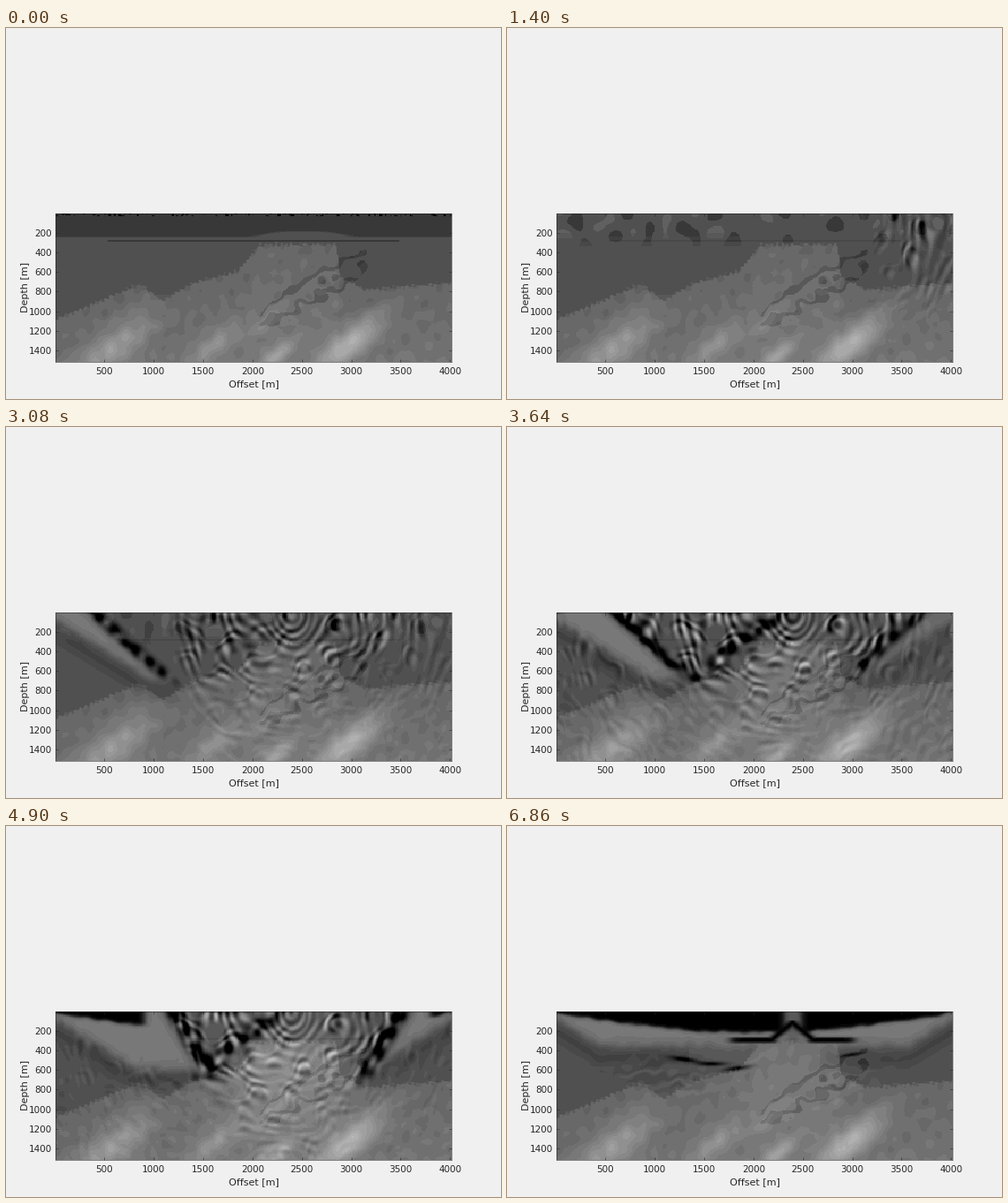
A matplotlib script for the animation above (7000 ms loop, 560 by 420 pixels).

```python
import numpy as np
import matplotlib.pyplot as plt
from matplotlib.animation import FuncAnimation

W, H, DPI = 560, 420, 100
FRAMES, INTERVAL = 50, 140
LEFT, TOP, PW, PH = 56, 210, 448, 168
X, Z = np.meshgrid(np.linspace(0, PW, 401), np.linspace(0, PH, 151))
APEX = 267
INK = "#262626"


def smooth(t, a, b):
    s = np.clip((t - a) / (b - a), 0, 1)
    return s * s * (3 - 2 * s)


def sigmoid(v):
    return 1 / (1 + np.exp(-np.clip(v, -40, 40)))


def blob(cx, cz, length, width, angle=0):
    """Soft ellipse; a positive angle rises to the right."""
    a = np.radians(angle)
    u = (X - cx) * np.cos(a) - (Z - cz) * np.sin(a)
    w = (X - cx) * np.sin(a) + (Z - cz) * np.cos(a)
    return np.exp(-(u / length) ** 2 - (w / width) ** 2)


def noise(size, seed):
    """Smooth random field with bumps about `size` pixels wide."""
    rng = np.random.default_rng(seed)
    field = np.zeros_like(X)
    for _ in range(14):
        a, p = rng.uniform(0, 2 * np.pi, 2)
        k = np.pi / size * rng.uniform(0.6, 1.4)
        field += np.cos(k * (X * np.cos(a) + Z * np.sin(a)) + p)
    return field / np.sqrt(7)


FINE, MID, WIDE, PATCH = noise(3, 1), noise(11, 2), noise(34, 3), noise(20, 4)


def earth():
    top = np.interp(X[0], [0, 96, 120, 158, 206, 230, 240, 318, 322, 350, PW],
                    [120, 80, 99, 78, 66, 36, 35, 35, 72, 86, 79])
    below = Z - top + 1.2 * FINE
    g = 80 + sigmoid(below * 2) * (21 + 0.17 * np.clip(below, 0, 110))
    tongues = np.sin((Z + 0.55 * X) / 4 + 1.3 * MID) > 0.35
    g -= 20 * tongues * (blob(295, 85, 80, 20, 32) > 0.4)
    lobes = [(62, 155, 60, 40), (180, 148, 36, 30),
             (250, 162, 22, 42), (335, 146, 44, 62)]
    for cx, cz, size, gain in lobes:
        g += gain * blob(cx, cz, size, size * 0.27 + 3, 40)
    g += 14 * blob(240, 122, 28, 9, 40) + 2.5 * MID * (below > 0)
    floor = 26 - 6 * np.exp(-((X - 280) / 46) ** 4)
    water = sigmoid((floor - Z) * 2)
    return g * (1 - water) + 56 * water, water


GROUND, WATER = earth()
SEABED = (abs(Z - 31) < 1) & (abs(X - 224) < 165)


def fronts(t):
    """Distance of the incoming surface wave from the left and right edge."""
    s = max(t - 2.5, 0)
    r = max(t - 3.6, 0)
    return 14 + 32 * s + 5.5 * s * s, 25 + 11.5 * r ** 2.15


def lean(t):
    return 1.1 - smooth(t, 4.2, 5.6)


def wake(g, x, front, t, start):
    """Grey wedge with a black upper layer trailing one surface wave."""
    on = smooth(t, start, start + 0.7)
    u = x - front - lean(t) * Z
    depth = np.minimum(8 + 0.62 * x, 75 - 37 * smooth(t, 4.2, 6.2))
    grey = on * sigmoid(-u / 3) * sigmoid((depth - Z + MID) / 3)
    fan = on * sigmoid(-u / 6) * np.exp(-((Z - depth - 14) / 12) ** 2)
    g = g * (1 - grey) + 118 * grey - 14 * fan * (x < 150)
    stripe = np.exp(-((u - 10) / 9) ** 2) * sigmoid((72 - Z) / 5)
    g = g - 85 * on * stripe * (1 - smooth(t, 5.8, 6.5)) * (1 + 0.5 * MID)
    edge = front - 54 * (1 - smooth(t, 4, 5.6))
    layer = (22 * np.clip(x / 170, 0, 1) ** 0.8 + 1) * smooth(t, 3.6, 4.6)
    dark = sigmoid(layer - Z + 0.5 * MID) * sigmoid((edge - x) / 2)
    return g * (1 - dark)


def ripples(t):
    """Rings that close in on the shot, broken up by the layering."""
    def rings(cx, cz, size, warp):
        r = np.hypot(X - cx, Z - cz)
        return np.cos(2 * np.pi * (r + 70 * t) / size + 2.2 * warp)

    return (rings(APEX, 0, 13, WIDE) + 0.7 * rings(190, -50, 15, PATCH)
            ) * np.clip(0.7 + 0.5 * PATCH, 0, 1.4)


def envelope(t):
    left, right = fronts(t)
    s = t - 1.4
    reach = 374 - 10 * s - 45 * s ** 3
    inside = (sigmoid((X - left - lean(t) * Z) / 6)
              * sigmoid((PW - right - lean(t) * Z - X) / 6))
    inside = np.maximum(inside, 0.4 * (1 - smooth(t, 4.2, 5.6)))
    if t < 3:
        inside = 1
    calm = 0.75 * smooth(t, 4.6, 5.5) * blob(270, 35, 50, 60)
    fade = 1 - smooth(t, 5.6, 6.7)
    gain = 34 * np.exp(-(Z / 75) ** 2) + 12 * smooth(t, 2.4, 3.6)
    return sigmoid((X - reach) / 10) * inside * (1 - calm) * fade * gain


def focus(g, t):
    """Dark tent under the shot and thin streaks left beside it."""
    on = smooth(t, 6.2, 6.8)
    off = abs(X - APEX)
    tent = np.exp(-((off - 1.2 * (Z - 12)) / 6) ** 2) * ((Z > 10) & (Z < 33))
    bar = sigmoid((3 - abs(Z - 32)) * 2) * sigmoid((off - 18) / 2)
    bar = bar * sigmoid((70 - off) / 3)
    g = g * (1 - on * np.maximum(tent, bar))
    streaks = sum(blob(145 + 30 * i, 54 + 5 * i, 16, 2.5, 8 * i - 8)
                  for i in range(3)) + 0.6 * blob(334, 48, 12, 2, 10)
    g = g - 85 * smooth(t, 4.9, 5.7) * np.clip(streaks, 0, 1)
    lines = np.sin((Z - 0.2 * abs(X - APEX) * np.sign(APEX - X)) / 2.6 + MID)
    zone = blob(125, 75, 60, 18, -8) + 0.6 * blob(325, 80, 55, 20, 25)
    return g + 11 * smooth(t, 4.4, 5.6) * lines * zone


def picture(i):
    t = i * INTERVAL / 1000
    g = GROUND + 24 * WATER * smooth(t, 0.1, 1.2)
    g = g - 22 * SEABED * (1 - 0.6 * smooth(t, 0.2, 1.2))
    early = smooth(t, 0.3, 1.2) * (1 - smooth(t, 2.8, 3.6))
    g = g - 22 * early * (PATCH > 0.9) * sigmoid((32 - Z) / 3)
    g = g + 18 * early * (PATCH < -1.1) * sigmoid((24 - Z) / 3)

    warm = smooth(t, 2.8, 5.4) * (1 - 0.65 * smooth(t, 5.8, 6.8))
    g = g + 36 * warm * blob(262, 60, 85, 65)
    g = g + envelope(t) * ripples(t)
    arm = np.exp(-((X - 250 + 1.2 * Z) / 15) ** 2) * sigmoid((72 - Z) / 5)
    arm = arm * smooth(t, 3, 3.6) * (1 - smooth(t, 5.2, 6.2))
    g = g - 50 * arm * (1 + 0.6 * MID)

    left, right = fronts(t)
    g = wake(g, X, left, t, 2)
    g = wake(g, PW - X, right, t, 3.2)
    g = focus(g, t)
    speckle = (Z < 3) & (FINE * (1 + MID) > 1)
    g = np.where(speckle, g * smooth(t, 0.4, 1.4), g)
    return np.clip(np.round(g / 8) * 8, 0, 255)


fig = plt.figure(figsize=(W / DPI, H / DPI), dpi=DPI, facecolor="#f0f0f0")
ax = fig.add_axes([LEFT / W, 1 - (TOP + PH) / H, PW / W, PH / H])
image = ax.imshow(picture(0), cmap="gray", vmin=0, vmax=255, aspect="auto",
                  interpolation="nearest", extent=(5, 4015, 1515, 5))
ax.set_xticks(range(500, 4001, 500))
ax.set_yticks(range(200, 1401, 200))
ax.tick_params(direction="in", length=2.5, width=0.4, color=INK,
               labelcolor=INK, labelsize=7.5, top=True, right=True)
ax.tick_params(axis="x", pad=4.4)
ax.tick_params(axis="y", pad=3)
for spine in ax.spines.values():
    spine.set(linewidth=0.4, color=INK)
fig.text(280 / W, 1 - 403.3 / H, "Offset [m]", size=8, color=INK,
         ha="center", va="center")
fig.text(22 / W, 1 - 293.5 / H, "Depth [m]", size=8, color=INK,
         ha="center", va="center", rotation=90)


def draw(i):
    image.set_data(picture(i))
    return [image]


anim = FuncAnimation(fig, draw, frames=FRAMES, interval=INTERVAL, repeat=True)
plt.show()
```
